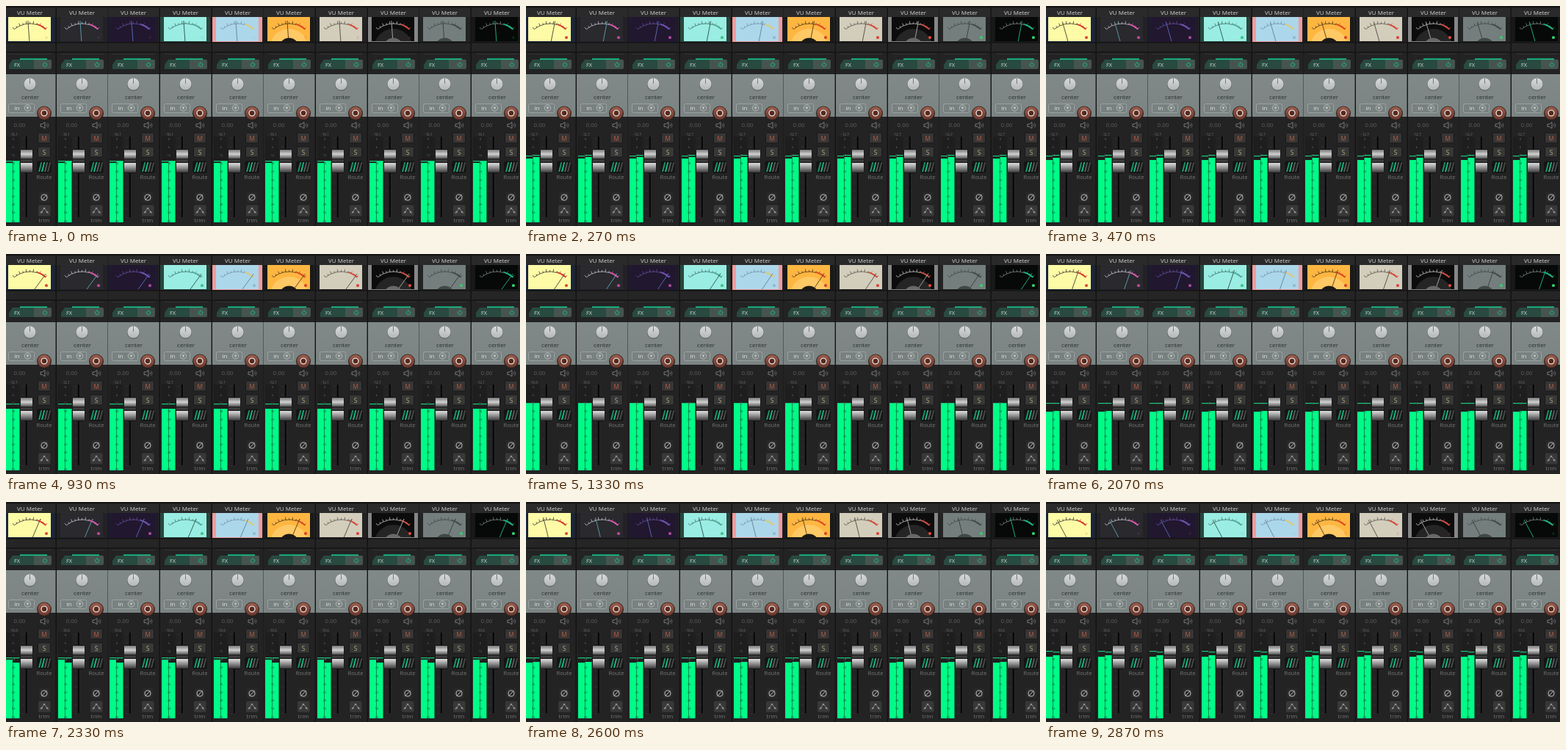
Recreate the animation shown at these times as an HTML page with a canvas. Size 700 by 300 pixels, loop 2.93 s.

```html
<!DOCTYPE html>
<html lang="en">
<head>
<meta charset="utf-8">
<title>Mixer with VU meters</title>
<style>
html, body { margin: 0; width: 100%; height: 100%; overflow: hidden; background: #232323; }
canvas { display: block; width: 700px; height: 300px; }
</style>
</head>
<body>
<canvas id="stage" width="700" height="300"></canvas>
<script>
const LOOP = 2930, FRAMES = 44, PITCH = 70.66, TRACKS = 10;
const FONT = '"Open Sans", "Noto Sans", sans-serif';
const GREEN = '#00fb87';
const stage = document.getElementById('stage');
const back = document.createElement('canvas');
back.width = 700;
back.height = 300;
let g = back.getContext('2d');

// step, needle angle, left level y, right level y
const poses = [
  [0, -4, 214, 211], [3, 20, 207, 206], [7, -16, 210, 207], [11, 6, 218, 216],
  [14, 36, 211, 211], [17, 16, 217, 216], [20, 34, 204, 204], [23, 8, 214, 213],
  [27, -17, 212, 211], [30, 12, 220, 219], [32, 26, 209, 208], [35, 23, 215, 219],
  [38, -10, 222, 221], [41, -22, 213, 211], [43, -28, 211, 209], [44, -4, 214, 211]
];
// step, left hold y, right hold y, readout
const holds = [
  [0, 211, 211, '-16.1'], [3, 204, 203, '-12.7'], [10, 204, 204, '-12.1'],
  [18, 203, 203, '-10.6'], [33, 212, 212, '-10.6'], [40, 203, 204, '-10.6']
];

const skins = [
  { rim: '#172640', face: '#fefba6', ink: '#33312a', hot: '#d63a2c', needle: '#55523e', led: '#d9483a' },
  { rim: '#222226', face: '#29292e', ink: '#c8c5cf', hot: '#d55cab', needle: '#5b97a4', led: '#c14a9c' },
  { rim: '#20192f', face: '#21172f', ink: '#63519b', hot: '#7455bd', needle: '#5667ad', led: '#b0489e' },
  { rim: '#29463f', face: '#9aede2', ink: '#3d6d68', hot: '#54a997', needle: '#365f5b', led: '#35c580' },
  { rim: '#f19b9d', face: '#acd7eb', ink: '#7591a1', hot: '#dfc879', needle: '#68899c', led: '#8eb9cf' },
  { rim: '#1b1a18', face: '#ffb641', ink: '#4c3515', hot: '#db4327', needle: '#66451a', led: '#d84126', dome: '#1d1a14', glow: '#ffc965' },
  { rim: '#222222', face: '#d3cdbc', ink: '#56534c', hot: '#cf4939', needle: '#59564f', led: '#d14336' },
  { rim: '#858585', face: '#0c0c0c', ink: '#c4c4c4', hot: '#d05142', needle: '#a1a1a1', led: '#ed4938', dome: '#686868', glow: '#252525' },
  { rim: '#222424', face: '#747e7d', ink: '#414948', hot: '#414948', needle: '#3b4443', led: '#35cd70', dome: '#424847' },
  { rim: '#171918', face: '#070908', ink: '#7c8982', hot: '#1dbd82', needle: '#1baa7c', led: '#30d46f' }
];

function box(x, y, w, h, fill) {
  g.fillStyle = fill;
  g.fillRect(x, y, w, h);
}
function round(x, y, w, h, r, fill, stroke) {
  g.beginPath();
  g.roundRect(x, y, w, h, r);
  paint(fill, stroke);
}
function disc(x, y, r, fill, stroke, width) {
  g.beginPath();
  g.arc(x, y, r, 0, Math.PI * 2);
  paint(fill, stroke, width);
}
function path(points, fill, stroke, width) {
  g.beginPath();
  points.forEach(([x, y]) => g.lineTo(x, y));
  paint(fill, stroke, width);
}
function paint(fill, stroke, width = 1) {
  if (fill) { g.fillStyle = fill; g.fill(); }
  if (stroke) { g.strokeStyle = stroke; g.lineWidth = width; g.stroke(); }
}
function text(s, x, y, size, fill) {
  g.font = size + 'px ' + FONT;
  g.textAlign = 'center';
  g.textBaseline = 'alphabetic';
  g.fillStyle = fill;
  g.fillText(s, x, y);
}
function shade(y0, y1, ...colors) {
  const s = g.createLinearGradient(0, y0, 0, y1);
  colors.forEach((c, i) => s.addColorStop(i / (colors.length - 1), c));
  return s;
}

function drawDial(skin) {
  box(-2, 15, 68, 34, skin.rim);
  box(3, 15, 58, 33, skin.face);
  g.save();
  g.beginPath();
  g.rect(3, 15, 58, 33);
  g.clip();
  if (skin.glow) disc(32.5, 57, 26, skin.glow);
  const arc = (r, from, to, color, width) => {
    const rad = a => (a - 90) * Math.PI / 180;
    g.beginPath();
    g.arc(32.5, 57, r, rad(from), rad(to));
    paint(null, color, width);
  };
  arc(33, -40, 17, skin.ink, .8);
  arc(33.5, 17, 41, skin.hot, 1.8);
  for (let i = 0; i < 11; i++) {
    const a = (-40 + i * 8) * Math.PI / 180, r = i % 2 ? 35 : 36.5;
    path([33, r].map(d => [32.5 + d * Math.sin(a), 57 - d * Math.cos(a)]),
      null, i > 7 ? skin.hot : skin.ink, .8);
  }
  g.restore();
}

function drawFx() {
  box(-2, 49, 70, 1.5, '#151515');
  box(-2, 51, 69, 11, '#252525');
  box(-2, 62, 70, 2, '#181818');
  box(4, 65, 58, 1, '#343434');
  path([[4, 86], [4, 80], [9, 73], [38, 73], [38, 86]], '#284a40');
  round(38, 73, 24, 13, [0, 2, 2, 0], '#46544f');
  box(19, 71.5, 37, 1.7, '#16c48c');
  text('FX', 15, 82.5, 7.5, '#d0d6d3');
  g.beginPath();
  g.arc(53, 80, 2.7, -.9, Math.PI + .9);
  paint(null, '#22bd88', .9);
  path([[53, 76], [53, 79.5]], null, '#22bd88', .9);
}

function drawPanel() {
  box(-2, 93, 70, 58, shade(93, 151, '#808988', '#7b8483'));
  disc(32.5, 107.5, 8.5, '#636b6a');
  disc(32.5, 106.5, 8, shade(98, 115, '#dadcdc', '#b2b6b6'));
  path([[32.5, 99], [32.5, 106]], null, '#737a79', 1);
  text('center', 33, 126.5, 8, '#272c2b');
  round(3.5, 133.5, 35, 12, 2, '#788180', '#9ba3a2');
  text('in', 15, 142, 8, '#e3e7e6');
  disc(29.5, 139, 4.2, null, '#bbc2c1', .9);
  path([[27.3, 137.5], [31.7, 137.5], [29.5, 141.5]], '#bbc2c1');
  disc(52, 146.5, 10, '#262323');
  disc(52, 146, 8.8, shade(137, 155, '#a35c4b', '#6e372b'));
  disc(52, 146, 5.3, '#55291f');
  disc(52, 146, 4, null, '#ded1cb', 1.6);
}

function drawButtons() {
  text('0.00', 18.5, 165, 8, '#606060');
  path([[47, 161], [49.5, 161], [53, 158.5], [53, 167], [49.5, 164.5], [47, 164.5], [47, 161]], null, '#858585', .9);
  [2.2, 4.3].forEach(r => {
    g.beginPath();
    g.arc(53.5, 162.8, r, -.8, .8);
    paint(null, '#777', .8);
  });
  round(43.5, 173, 17, 14, 1.5, '#383534', '#181818');
  text('M', 52, 183.5, 8.5, '#ad5b43');
  round(43.5, 192, 17, 14, 1.5, '#383838', '#181818');
  text('S', 52, 202.5, 8.5, '#b7aa7d');

  round(43, 212, 18, 15, 1.5, '#141716', '#101010');
  [['#1b9c71', 46], ['#20bd88', 50], ['#5a5f5d', 54], ['#4a4d4c', 58]].forEach(([c, x]) =>
    path([[x - 2, 226], [x + 1.5, 213], [x + 3.2, 213], [x, 226]], c));
  text('Route', 52, 236.3, 7.6, '#777');

  round(45, 254, 14, 14, 2, '#292929');
  disc(52, 261, 4, null, '#b8b8b8', 1.1);
  path([[48.6, 264.6], [55.4, 257.4]], null, '#b8b8b8', 1);
  round(44, 271.5, 16.5, 15, 1.5, '#383838');
  path([[46.5, 283], [49, 280], [52, 275.5], [55.5, 280], [58, 283]], null, '#898989', .9);
  [[48.5, 281], [52, 276], [56, 281]].forEach(([x, y]) => disc(x, y, 1.3, '#929292'));
  text('trim', 52, 294.6, 7.6, '#777');
}

function drawFader() {
  box(26.8, 178, 2.6, 110, '#090909');
  box(29.4, 178, .6, 110, '#353535');
  for (let y = 180; y < 290; y += 12) box(22, y, 3, .7, '#343434');
  round(19.5, 195, 17, 33, 2, '#121212');
  box(20, 196, 16, 12, shade(196, 208, '#777777', '#d1d1d1', '#555555'));
  box(20, 208, 16, 6, shade(208, 214, '#1a1a1a', '#454545', '#191919'));
  box(20, 214, 16, 13, shade(214, 227, '#e0e0e0', '#909090', '#393939'));
}

function drawTrack(skin) {
  box(-2, 0, 70, 300, '#232323');
  box(-2, 0, 70, 2, '#151515');
  box(-2, 3, 70, 12, '#2a2a2a');
  text('VU Meter', 32.5, 11.8, 8, '#d4d4d4');
  drawDial(skin);
  drawFx();
  drawPanel();
  drawButtons();
  drawFader();
  box(0, 178, 18.5, 117, '#1e1e1e');
  box(67.6, 0, 1.4, 300, '#131313');
}

function drawNeedle(skin, angle, lit) {
  const a = angle * Math.PI / 180;
  g.save();
  g.beginPath();
  g.rect(3, 15, 58, 33);
  g.clip();
  path([[32.5, 57], [32.5 + 37 * Math.sin(a), 57 - 37 * Math.cos(a)]], null, skin.needle, 1);
  if (skin.dome) disc(32.5, 57, 13.5, skin.dome);
  g.globalAlpha = lit ? 1 : .13;
  disc(55, 43, 2.1, skin.led);
  g.restore();
}

function drawLevels(left, right, hold) {
  box(0, left, 9, 295 - left, GREEN);
  box(9.5, right, 9, 295 - right, GREEN);
  box(0, Math.min(hold[1], left), 9, 1.2, '#13cf7c');
  box(9.5, Math.min(hold[2], right), 9, 1.2, '#13cf7c');
  text(hold[3], 10.5, 177, 4.6, '#777');
  for (let i = 0; i < 11; i++) {
    const y = 181 + i * 11.2;
    text(i ? String(i * 6) : '0', 10, y + 1.6, 4, y > right ? '#075e38' : '#707070');
  }
}

function poseAt(step) {
  const i = poses.findIndex(p => p[0] > step), a = poses[i - 1], b = poses[i];
  const u = (step - a[0]) / (b[0] - a[0]);
  return a.map((v, j) => v + (b[j] - v) * u);
}

function eachTrack(draw) {
  for (let i = 0; i < TRACKS; i++) {
    g.save();
    g.translate(Math.round(i * PITCH), 0);
    draw(skins[i]);
    g.restore();
  }
}

g.fillStyle = '#232323';
g.fillRect(0, 0, 700, 300);
eachTrack(drawTrack);
g = stage.getContext('2d');

const stepTime = k => Math.round(k * 20 / 3) * 10;
const start = performance.now();
let shown = -1;
function tick() {
  const t = (performance.now() - start) % LOOP;
  let step = FRAMES - 1;
  while (step && stepTime(step) > t) step--;
  if (step !== shown) {
    shown = step;
    const [, angle, left, right] = poseAt(step);
    const hold = holds.filter(h => h[0] <= step).pop();
    const lit = step >= 3 && step < 40;
    g.drawImage(back, 0, 0);
    eachTrack(skin => {
      drawNeedle(skin, angle, lit);
      drawLevels(Math.round(left), Math.round(right), hold);
    });
  }
  requestAnimationFrame(tick);
}
tick();
</script>
</body>
</html>
```
